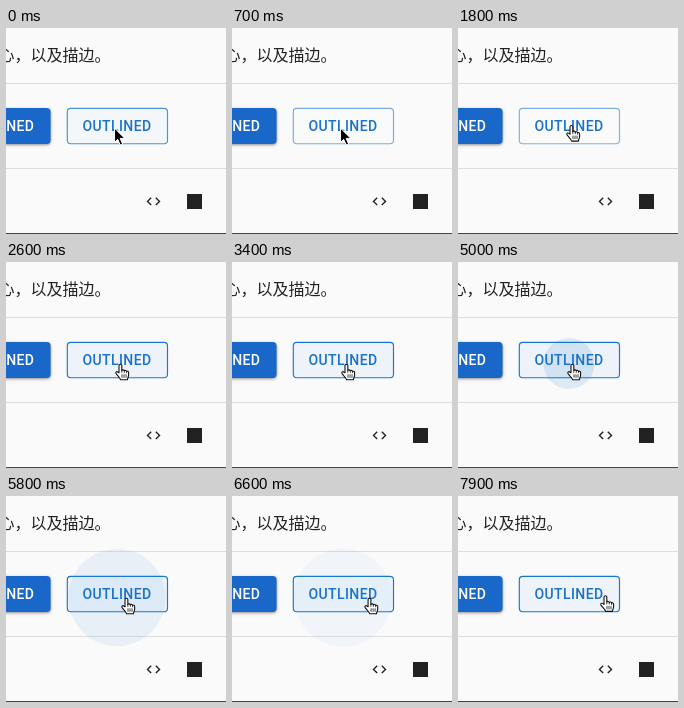
Recreate the animation shown at these times as an HTML page. Size 220x206 px, loop 8000 ms.

```html
<!DOCTYPE html>
<html lang="zh-CN">
<head>
<meta charset="utf-8">
<style>
  html, body { margin: 0; width: 100%; height: 100%; overflow: hidden; background: #fafafa; }
  svg { display: block; width: 220px; height: 206px; }
  .note { font: 16px "Noto Sans CJK SC", "Noto Sans CJK", sans-serif; fill: #222; }
  .label { font: 500 14px Roboto, sans-serif; letter-spacing: .4px; }
  .raised { filter: drop-shadow(0 1.5px 1.2px rgba(0,0,0,.32)) drop-shadow(0 1px 2px rgba(0,0,0,.12)); }
  .cursor { stroke-linejoin: round; stroke-linecap: round; }
</style>
</head>
<body>
<svg viewBox="0 0 220 206">
  <rect width="220" height="206" fill="#fafafa"/>
  <text class="note" x="-7.4" y="33">心，以及描边。</text>
  <path d="M0 55.5H220M0 140.5H220" stroke="#dedede"/>
  <path d="M0 205.5H220" stroke="#454347"/>

  <rect class="raised" x="-75" y="80" width="119.6" height="36" rx="4" fill="#1967c8"/>
  <text class="label" x="28.4" y="103" text-anchor="end" fill="#fff">CONTAINED</text>

  <rect id="button" x="61.3" y="80.4" width="100.2" height="35.3" rx="3.5" fill="#1980d2" stroke="#1976d0" stroke-width="1.15"/>
  <text class="label" x="76.5" y="103" fill="#1a72cc">OUTLINED</text>
  <circle id="ripple" cx="111" cy="101.5" fill="#1976d2"/>

  <path transform="translate(139.1 165) scale(.7)" fill="#222"
    d="M9.4 16.6 4.8 12l4.6-4.6L8 6l-6 6 6 6zM14.6 16.6l4.6-4.6-4.6-4.6L16 6l6 6-6 6z"/>
  <rect x="181" y="166" width="15" height="15" fill="#222"/>

  <path id="arrow" class="cursor" fill="#000" stroke="#fff"
    d="M.5.5V14.3L3.7 11.3 6.2 17 8.6 16 6.2 10.4H10.6Z"/>
  <g id="hand" class="cursor" fill="#fff" stroke="#111" stroke-width="1.1">
    <path d="M4 9.4V2.2a1.4 1.4 0 0 1 2.8 0V7c.4-.9 2.3-.7 2.5.4.5-.7 2.1-.4 2.3.6.7-.5 2 0 2 1.2v2.6c0 1.6-1 2.4-1.2 4.6H5.6C5.2 14.4 2 12 .9 9.9.3 8.6 1.8 7.8 2.7 8.6Z"/>
    <path d="M6.8 7V9M9.3 7.4V9M11.6 8V9.4M7 11.3V14M9 11.3V14M11 11.3V14" stroke-width=".8"/>
  </g>
</svg>
<script>
const LOOP = 8000, STEP = 100;

function set(id, attrs) {
  const el = document.getElementById(id);
  for (const name in attrs) el.setAttribute(name, attrs[name]);
}

// Progress from 0 to 1 between two times, linear and smoothed
const ramp = (t, from, to) => Math.min(1, Math.max(0, (t - from) / (to - from)));
const ease = (t, from, to) => {
  const u = ramp(t, from, to);
  return u * u * (3 - 2 * u);
};

function draw(now) {
  const t = Math.floor(now % LOOP / STEP) * STEP;

  const hover = .5 * (1 - ease(t, 0, 900)) + ease(t, 1800, 2500);
  set("button", { "fill-opacity": .055 * hover, "stroke-opacity": .55 + .45 * hover });

  // The press spreads fast, slows down and fades
  const spread = ramp(t, 4800, 6800);
  set("ripple", { r: 49 * (1 - (1 - spread) ** 7), opacity: .14 * (1 - ramp(t, 4800, 7500)) ** 1.2 });

  const pointing = t >= 1100;
  const settle = ease(t, 1800, 2400);
  const leave = ease(t, 5200, 7400);
  const x = 108 + settle + 33 * leave;
  const y = pointing ? 96.7 + 4.7 * settle - 2.4 * ease(t, 6600, 7400) : 100;
  const transform = `translate(${x} ${y})`;
  set("arrow", { transform, visibility: pointing ? "hidden" : "visible" });
  set("hand", { transform, visibility: pointing ? "visible" : "hidden" });
}

const start = performance.now();
function frame() {
  draw(performance.now() - start);
  requestAnimationFrame(frame);
}
frame();
</script>
</body>
</html>
```
